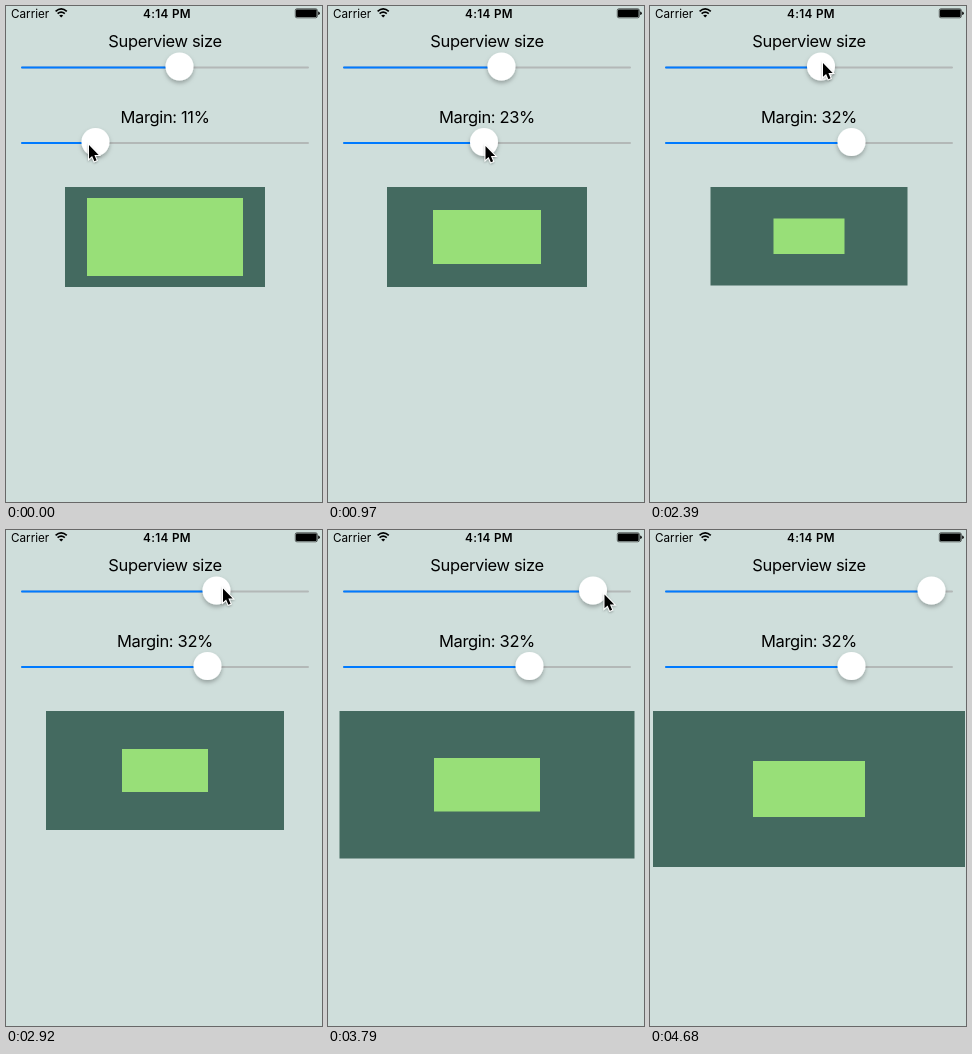
These frames come from a looping animation (316x496 px, 5410 ms). An HTML page:

```html
<!DOCTYPE html>
<html lang="en">
<head>
<meta charset="utf-8">
<title>Layout margins</title>
<style>
  html, body { margin: 0; width: 100%; height: 100%; overflow: hidden; background: #cfdedb; }
  svg { display: block; width: 316px; height: 496px; }
  text { font-family: Inter, "Liberation Sans", sans-serif; font-size: 11.7px; fill: #000; }
  .label { font-size: 16.5px; letter-spacing: -.36px; text-anchor: middle; }
  .clock { font-weight: 600; letter-spacing: .35px; text-anchor: middle; }
</style>
</head>
<body>
<svg viewBox="0 0 316 496">
  <defs>
    <filter id="soft" x="-50%" y="-50%" width="200%" height="200%">
      <feDropShadow dx="0" dy="2.5" stdDeviation="2.2" flood-opacity=".28"/>
    </filter>
    <filter id="faint" x="-50%" y="-50%" width="200%" height="200%">
      <feDropShadow dx="0" dy="1" stdDeviation=".8" flood-opacity=".3"/>
    </filter>
    <rect id="rail" x="15" y="-1" width="288" height="2" rx="1" fill="#b3b8b7"/>
    <circle id="knob" r="14" fill="#fff" filter="url(#soft)"/>
  </defs>
  <rect width="316" height="496" fill="#cfdedb"/>

  <text x="5" y="11.5">Carrier</text>
  <g fill="none" stroke="#000" stroke-width="1.7">
    <path d="M49.6 5.4Q55.2 .4 60.8 5.4"/>
    <path d="M51.6 7.7Q55.2 4.5 58.8 7.7"/>
  </g>
  <path d="M53.2 9.5Q55.2 7.8 57.2 9.5L55.2 11.6Z"/>
  <text class="clock" x="161" y="11.5">4:14 PM</text>
  <rect x="289.3" y="2.8" width="22" height="9" rx="1.6" fill="none" stroke="#000" stroke-width=".6"/>
  <rect x="290" y="3.5" width="20.6" height="7.6" rx=".8"/>
  <path d="M312.2 5.6Q313.8 5.9 313.8 7.3T312.2 9Z"/>

  <text class="label" x="159" y="41.3">Superview size</text>
  <use href="#rail" y="61.5"/>
  <rect id="sizeFill" x="15" y="60.5" height="2" rx="1" fill="#007aff"/>
  <use id="sizeKnob" href="#knob" y="60.5"/>

  <text class="label" id="marginText" x="159" y="117"></text>
  <use href="#rail" y="137"/>
  <rect id="marginFill" x="15" y="136" height="2" rx="1" fill="#007aff"/>
  <use id="marginKnob" href="#knob" y="136"/>

  <rect id="outer" fill="#446a60"/>
  <rect id="inner" fill="#98df78"/>

  <path id="cursor" d="M0 0V13.8L3.1 11 5.4 16.2 7.6 15.2 5.4 10.1H9.7Z"
    fill="#000" stroke="#fff" stroke-width="2" paint-order="stroke" filter="url(#faint)"/>
</svg>
<script>
const LOOP = 5410, TICK = 88.27, GONE = 53;
const $ = id => document.getElementById(id);

const ramp = (n, from, to) => Math.min(1, Math.max(0, (n - from) / (to - from)));
const snap = v => Math.round(v * 2) / 2;

function set(el, attrs) {
  for (const k in attrs) el.setAttribute(k, attrs[k]);
}

function box(el, left, top, right, bottom) {
  const x = snap(left), y = snap(top);
  set(el, { x, y, width: snap(right) - x, height: snap(bottom) - y });
}

function slide(name, x) {
  set($(name + 'Fill'), { width: x - 15 });
  set($(name + 'Knob'), { x });
}

function draw(t) {
  // The screen refreshes in steps; each gesture is a progress from 0 to 1.
  const n = Math.floor((t + 8) / TICK);
  const marginDrag = ramp(n, 0, 19) ** .95;
  const travel = ramp(n, 20, 25);
  const sizeDrag = 1 - (1 - ramp(n, 27, 48)) ** 1.32;
  const exit = ramp(n, 51, 52);

  const mx = snap(89.5 + 112 * marginDrag);
  const sx = n < 27 ? 173.5 : snap(171 + 110.5 * sizeDrag);
  slide('margin', mx);
  slide('size', sx);

  const percent = Math.round((mx - 29.5) / 5.42);
  $('marginText').textContent = `Margin: ${percent}%`;

  const w = Math.round(200 + (sx - 173.5) * 1.04), h = w / 2;
  const left = 159 - w / 2, dx = w * percent / 100, dy = dx / 2;
  box($('outer'), left, 181, left + w, 181 + h);
  box($('inner'), left + dx, 181 + dy, left + w - dx, 181 + h - dy);

  const cx = 83 + 125 * marginDrag - 35 * travel + 122 * sizeDrag - 30 * exit;
  const cy = 139 + 2 * marginDrag - 84 * travel + 10.5 * sizeDrag ** 2 + 290 * exit;
  set($('cursor'), {
    transform: `translate(${snap(cx)} ${snap(cy)})`,
    visibility: n < GONE ? 'visible' : 'hidden'
  });
}

const start = performance.now();
function frame() {
  draw((performance.now() - start) % LOOP);
  requestAnimationFrame(frame);
}
frame();
</script>
</body>
</html>
```
